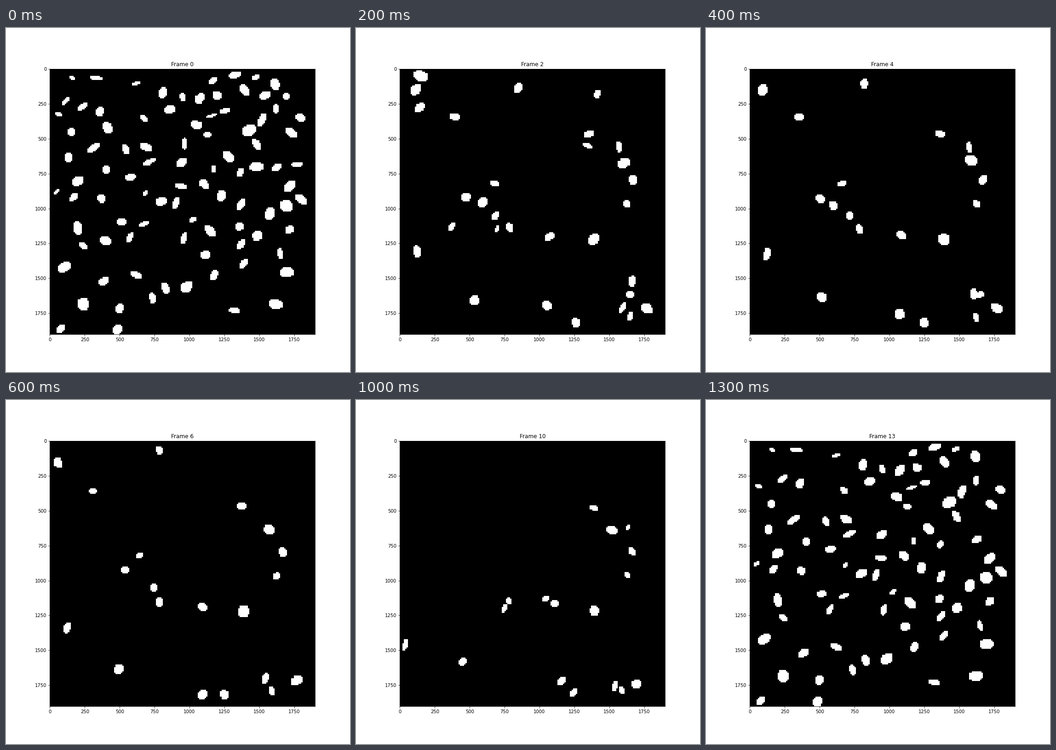
A matplotlib script for the animation above (1.4 s loop, 748 by 748 pixels).

```python
import numpy as np
import matplotlib.pyplot as plt
from matplotlib.animation import FuncAnimation

FRAMES = 14
LAST_SPARSE = FRAMES - 2
CELLS = 190      # cells per side
UNIT = 10        # axis units per cell
SIZE = 748       # stage side in pixels
DPI = 72
CROWD = 92
NEWCOMERS = 8    # crowd members missing from the closing frame

rows, cols = np.mgrid[:CELLS, :CELLS] + 0.5


def stamp(grid, x, y, w, h, tilt, rng):
    """Fill a tilted ellipse with a rough edge, snapped to whole cells."""
    w, h = max(round(w), 1), max(round(h), 1)
    left, top = round(x - w / 2), round(y - h / 2)
    u = (cols - left) * 2 / w - 1
    v = (rows - top) * 2 / h - 1
    distance = (u * u + v * v - 2 * tilt * u * v) / (1 - tilt ** 2)
    edge = 1.12 + rng.uniform(-0.18, 0.18, grid.shape)
    grid[(distance <= edge) & (abs(u) < 1) & (abs(v) < 1)] = 1


def random_blob(rng, x, y):
    w, h = np.clip(rng.normal(6.4, 1.7, 2), 3, 10)
    return x, y, w, h, rng.uniform(-0.7, 0.5)


def scatter(count, seed, gap=10):
    """Random blobs kept apart, thinning out towards the lower right."""
    rng = np.random.default_rng(seed)
    blobs = []
    while len(blobs) < count:
        x, y = rng.uniform(4, [180, 187])
        thinned = y > 125 and rng.random() < 0.3 + 0.4 * x / CELLS
        crowded = any(np.hypot(x - b[0], y - b[1]) < gap for b in blobs)
        if not thinned and not crowded:
            blobs.append(random_blob(rng, x, y))
    return blobs


class Drifter:
    """Glides through evenly timed key points and shrinks a little."""

    def __init__(self, w, h, *points, born=1, dies=LAST_SPARSE):
        self.size = np.array([w, h])
        self.points = np.array(points)
        self.born, self.dies = born, dies

    def draw(self, grid, t, rng):
        if not self.born <= t <= self.dies:
            return
        progress = np.clip((t - 2) / (min(self.dies, 10) - 2), 0, 1)
        stops = np.linspace(0, 1, len(self.points))
        x, y = (np.interp(progress, stops, p) for p in self.points.T)
        w, h = self.size * (1 - 0.12 * progress)
        stamp(grid, x, y, w, h, rng.uniform(-0.4, 0.3), rng)


LASTING = [
    Drifter(7, 5, (136, 46), (139, 48)),
    Drifter(9, 7, (160, 67), (157, 64), (152, 64)),
    Drifter(6, 7, (167, 79)),
    Drifter(5, 5, (163, 96)),
    Drifter(5, 6, (68, 105), (75, 105), (78, 114)),
    Drifter(5, 7, (79, 114), (79, 115), (75, 120)),
    Drifter(7, 6, (108, 120), (111, 117)),
    Drifter(8, 8, (139, 122)),
    Drifter(5, 9, (12, 130), (12, 134), (4, 146)),
    Drifter(7, 7, (53, 165), (49, 163), (45, 158)),
    Drifter(7, 7, (105, 170), (109, 181), (116, 172)),
    Drifter(6, 7, (126, 182), (124, 180)),
    Drifter(5, 8, (166, 152), (154, 170), (154, 175)),
    Drifter(8, 7, (177, 172), (177, 171), (169, 174)),
    Drifter(4, 6, (165, 177), (159, 179), (159, 178)),
]
PASSING = [
    Drifter(7, 8, (12, 15), (3, 15), dies=8),
    Drifter(6, 7, (85, 14), (79, 7), dies=6),
    Drifter(7, 5, (40, 34), (31, 36), dies=6),
    Drifter(6, 4, (68, 82), (64, 82), dies=6),
    Drifter(7, 6, (47, 92), (54, 93), dies=6),
    Drifter(7, 7, (60, 96), (60, 98), dies=4),
    Drifter(3, 4, (164, 62), born=7),
    Drifter(6, 5, (104, 113), born=7),
]
crowd = scatter(CROWD, seed=4)
specks = scatter(18, seed=9)


def scene(t):
    rng = np.random.default_rng(t)
    grid = np.zeros((CELLS, CELLS))
    if t == 0:
        still = crowd
    elif t == FRAMES - 1:
        still = crowd[:-NEWCOMERS]
    else:
        still = specks[:36 >> t]  # half of them vanish each frame
        for drifter in LASTING + PASSING:
            drifter.draw(grid, t, rng)
    for blob in still:
        stamp(grid, *blob, rng)
    return grid


plt.rcParams["font.family"] = "DejaVu Sans"
fig = plt.figure(figsize=(SIZE / DPI, SIZE / DPI), dpi=DPI)
# Default margins of a 10.4 inch figure whose last part-pixel is cut off.
margins = np.array([0.125, 0.11, 0.775, 0.77])
ax = fig.add_axes(margins * 10.4 * DPI / SIZE)
side = CELLS * UNIT
image = ax.imshow(scene(0), cmap="gray", vmin=0, vmax=1,
                  interpolation="nearest", extent=(0, side, side, 0))
title = ax.set_title("Frame 0")


def update(t):
    image.set_data(scene(t))
    title.set_text(f"Frame {t}")
    return image, title


anim = FuncAnimation(fig, update, frames=FRAMES, interval=100, repeat=True)
plt.show()
```
